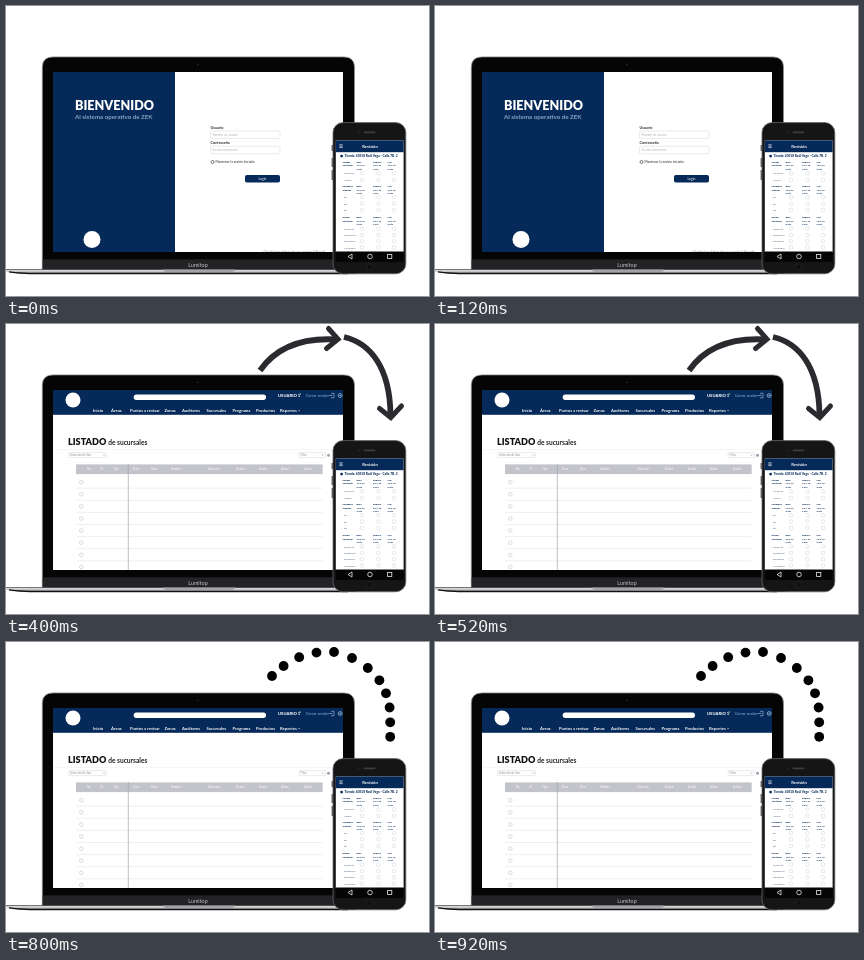
Recreate the animation shown at these times as an HTML page. Size 423x290 px, loop 1 s.

```html
<!DOCTYPE html>
<html lang="es">
<head>
<meta charset="utf-8">
<title>Panel y app</title>
<style>
  html, body { margin: 0; width: 100%; height: 100%; overflow: hidden; background: #fff; }
  svg { display: block; width: 100vw; height: 100vh; }
  text { font-family: Lato, "Open Sans", sans-serif; }
</style>
</head>
<body>
<svg id="stage" viewBox="0 0 423 290">
  <defs>
    <linearGradient id="metal" x1="0" x2="0" y1="0" y2="1">
      <stop offset="0" stop-color="#e4e5e7"/>
      <stop offset=".45" stop-color="#c3c5c8"/>
      <stop offset="1" stop-color="#1d1d1f"/>
    </linearGradient>
    <clipPath id="view"><rect x="47" y="66" width="290" height="180"/></clipPath>
  </defs>
  <g id="laptop"></g>
  <g clip-path="url(#view)">
    <g id="login"></g>
    <g id="list"></g>
  </g>
  <g id="phone"></g>
  <g id="arrowA"></g>
  <g id="arrowB"></g>
  <g id="dotsA"></g>
  <g id="dotsB"></g>
</svg>
<script>
const NAVY = '#052a5a', INK = '#2b2b2f', GREY = '#8b8f98', LINE = '#e3e4e8';
const LOOP = 1000;
const $ = id => document.getElementById(id);

function add(parent, tag, attrs, content) {
  const el = document.createElementNS('http://www.w3.org/2000/svg', tag);
  for (const k in attrs) el.setAttribute(k, attrs[k]);
  if (content) el.textContent = content;
  parent.appendChild(el);
  return el;
}
const rect = (p, x, y, width, height, fill, more) =>
  add(p, 'rect', { x, y, width, height, fill, ...more });
const circle = (p, cx, cy, r, fill, more) => add(p, 'circle', { cx, cy, r, fill, ...more });
const path = (p, d, stroke, width, more) =>
  add(p, 'path', { d, fill: 'none', stroke, 'stroke-width': width, ...more });
const text = (p, x, y, size, str, fill = INK, weight = 400, anchor = 'start') =>
  add(p, 'text', { x, y, 'font-size': size, fill, 'font-weight': weight, 'text-anchor': anchor }, str);
const box = (p, x, y, w, h) =>
  rect(p, x, y, w, h, '#fff', { stroke: '#d3d5d9', 'stroke-width': .5, rx: .8 });

function drawLaptop(g) {
  path(g, 'M36.3 264V61.5Q36.3 50.9 47 50.9H337.8Q348.5 50.9 348.5 61.5V264Z', '#8f9194', .8, { fill: '#050505' });
  rect(g, 36.7, 253.3, 311.4, 10.2, '#232326');
  rect(g, 47, 66, 290, 180, '#fff');
  circle(g, 192, 58.5, .8, '#2b2f38');
  text(g, 192, 261, 5.4, 'Lumitop', '#c4c4c6', 400, 'middle');
  path(g, 'M0 263.5H350V268H32Q10 268 0 265.5Z', 'none', 0, { fill: 'url(#metal)' });
  path(g, 'M0 263.5H350', '#222', .6);
  path(g, 'M156.5 263.6Q157.5 266 160 266H226Q228.5 266 229.5 263.6Z', 'none', 0, { fill: '#a2a4a8' });
  path(g, 'M3 265.8Q14 267.6 32 267.6H342', '#111', 1.2);
}

function drawLogin(g) {
  rect(g, 47, 66, 122, 182, NAVY);
  text(g, 69, 104, 12.6, 'BIENVENIDO', '#fff', 900);
  text(g, 69, 113, 6.2, 'Al sistema operativo de ZEK', '#8ba3c2', 700);
  circle(g, 86, 233.5, 8.5, '#fff');
  text(g, 204.5, 122.8, 3.8, 'Usuario', INK, 700);
  box(g, 204.5, 125, 69.5, 7.4);
  text(g, 206.5, 129.9, 3, 'Nombre de usuario', '#b0b3b9');
  text(g, 204.5, 138.2, 3.8, 'Contraseña', INK, 700);
  box(g, 204.5, 140.3, 69.5, 7.4);
  text(g, 206.5, 145.2, 3, 'Escriba contraseña', '#b0b3b9');
  circle(g, 206.5, 156, 1.5, '#fff', { stroke: INK, 'stroke-width': .6 });
  text(g, 209.5, 157.3, 3.3, 'Mantener la sesión iniciada', INK);
  rect(g, 239, 169, 35, 7.6, NAVY, { rx: 1.8 });
  text(g, 256.5, 174, 3.4, 'Login', '#fff', 400, 'middle');
  text(g, 256, 247.2, 3.8, '¿Olvidó los datos de su cuenta? Ayuda', GREY);
}

function drawList(g) {
  rect(g, 47, 66, 291, 24.8, NAVY);
  circle(g, 67, 76, 7.5, '#fff');
  rect(g, 127.7, 70.6, 132.3, 5.3, '#fff', { rx: 2.6 });
  text(g, 272, 72.8, 4.2, 'USUARIO 1', '#fff', 800);
  circle(g, 294.3, 70, .8, '#7fc9a0');
  text(g, 300, 72.8, 3.9, 'Cerrar sesión', '#8fb4d8');
  path(g, 'M325 69.3H328V73.8H325M322.5 71.5H326.5', '#a8c6e2', .6);
  circle(g, 334.2, 71.5, 2, 'none', { stroke: '#a8c6e2', 'stroke-width': .6 });
  path(g, 'M332.2 71.5h4M334.2 69.5v4', '#a8c6e2', .4);
  [['Inicio', 87], ['Áreas', 105], ['Puntos a revisar', 124], ['Zonas', 158.5], ['Auditores', 176],
   ['Sucursales', 200.5], ['Programa', 226.5], ['Productos', 250], ['Reportes', 274]]
    .forEach(([name, x]) => text(g, x, 88.2, 4.2, name, '#fff', 700));
  path(g, 'M292.3 86.6h1.6', '#fff', .6);

  text(g, 62, 121.3, 9.1, 'LISTADO', '#111', 900);
  text(g, 102.2, 121.3, 6.6, 'de sucursales', '#222', 700);
  path(g, 'M47 125.6H337', '#ececef', .5);
  box(g, 62.5, 128.6, 38, 5);
  text(g, 64, 132.1, 2.8, 'Selección de lista', GREY);
  path(g, 'M97 130.5l1.1 1.2 1.1-1.2', GREY, .5);
  box(g, 293, 128.6, 26.5, 5);
  text(g, 294.5, 132.1, 2.8, 'Filtro', GREY);
  path(g, 'M315.5 130.5l1.1 1.2 1.1-1.2', GREY, .5);
  circle(g, 322.5, 131.2, 1.5, '#9aa1ad');

  for (let i = 0; i < 8; i++) {
    const y = 158.2 + i * 12.1;
    circle(g, 75.3, y, 1.8, '#fff', { stroke: '#b4b7bd', 'stroke-width': .5 });
    path(g, `M70 ${y + 6}H316.5`, LINE, .6);
  }
  rect(g, 70, 140.4, 246.7, 9.7, '#c3c3ca');
  [['No.', 83], ['ID', 96], ['Tipo', 110], ['Clave', 130], ['Zona', 148], ['Nombre', 170], ['Dirección', 208],
   ['Ciudad', 234], ['Estado', 257], ['Activo', 279], ['Acción', 302]]
    .forEach(([name, x]) => text(g, x, 146.3, 2.7, name, '#f1f1f4', 700, 'middle'));
  path(g, 'M122.3 140V248', '#a5a7ae', .7);
}

function drawPhone(g) {
  [[139, 6], [152, 9], [164, 10]].forEach(([y, h]) => rect(g, 325.6, y, 1.6, h, '#55575b'));
  rect(g, 327, 116.6, 72.8, 151.2, '#151516', { rx: 10, stroke: '#66686c', 'stroke-width': .8 });
  rect(g, 357.5, 125.6, 12, 1.6, '#3b3c40', { rx: .8 });
  circle(g, 353, 126.4, .9, '#25272f');
  rect(g, 329.8, 134.5, 67.8, 111.5, '#fff');
  rect(g, 329.8, 134.5, 67.8, 11.7, NAVY);
  path(g, 'M333.3 138.8h3.4M333.3 140.2h3.4M333.3 141.6h3.4', '#fff', .6);
  text(g, 364, 142, 4.2, 'Revisión', '#fff', 700, 'middle');
  circle(g, 335.6, 150.1, 1.4, NAVY);
  text(g, 338.5, 151.3, 3.2, 'Tienda: 40518 Raúl Vega - Calle 7B. 2', NAVY, 800);

  const sections = [
    [157, 'Limpia', 'Ventanal', [167.3, 174], ['Sin polvo', 'Vidrios']],
    [181.3, 'Limpieza', 'Trabajo', [191.2, 197.5, 204], ['B1', 'B2', 'B3']],
    [212.3, 'Grupo', 'Ventanal', [222.5, 229, 235.3, 241.5], ['Producto', 'Referencia', 'Estantería', 'Mostrador']]
  ];
  const marks = [['Bien', 350.5, 356], ['Regular', 367, 372.5], ['Mal', 381.5, 388]];
  for (const [y, a, b, rows, names] of sections) {
    [a, b].forEach((s, i) => text(g, 336.5, y + i * 3.3, 2.6, s, NAVY, 800));
    for (const [name, x] of marks)
      [name, '10 a 15', '5 pts'].forEach((s, i) => text(g, x, y + i * 3.3, 2.5, s, NAVY, 700));
    rows.forEach((ry, i) => {
      text(g, 338, ry + 1, 2.5, names[i], '#51607a');
      marks.forEach(m => circle(g, m[2], ry, 1.8, '#fff', { stroke: '#cdd0d5', 'stroke-width': .5 }));
    });
  }
  rect(g, 329.8, 245.5, 67.8, 10.5, '#050505');
  path(g, 'M346 248v5l-4-2.5z', '#e8e8e8', .8);
  circle(g, 364, 250.5, 2.3, 'none', { stroke: '#e8e8e8', 'stroke-width': .8 });
  rect(g, 381.6, 248.4, 4.2, 4.2, 'none', { stroke: '#e8e8e8', 'stroke-width': .8 });
  circle(g, 363.6, 261, 3.3, '#101012', { stroke: '#2c2d30', 'stroke-width': .6 });
}

function drawArrow(g, shaft, head) {
  path(g, shaft, INK, 5.8);
  path(g, head, INK, 5, { 'stroke-linecap': 'round' });
}
const drawDots = (g, points) => points.forEach(([x, y]) => circle(g, x, y, 4.9, '#000'));

drawLaptop($('laptop'));
drawLogin($('login'));
drawList($('list'));
drawPhone($('phone'));
drawArrow($('arrowA'), 'M254 46.5C269 25 294 13.5 330 15.5', 'M322.5 4.5L332 15.2L320.5 24.5');
drawArrow($('arrowB'), 'M338 13C364 19 384 43 384.5 91', 'M373.5 84.5L384.8 93.5L395.5 82');
drawDots($('dotsA'), [[266, 34], [277.6, 24], [293.2, 15.2], [310.5, 10.6], [328, 10]]);
drawDots($('dotsB'), [[346, 16], [361.8, 26], [373.4, 38.3], [380, 51.3], [383.6, 65.5], [384.2, 80.3], [384.2, 94.8]]);

// id, shown from, hidden at (ms)
const steps = [
  ['login', 0, 200],
  ['list', 200, 1000],
  ['arrowA', 200, 600],
  ['arrowB', 400, 800],
  ['dotsA', 600, 1000],
  ['dotsB', 800, 1000]
];
for (const [id, from, to] of steps) {
  const key = (ms, opacity) => ({ offset: ms / LOOP, opacity, easing: 'step-end' });
  const keys = [key(from, 1)];
  if (from > 0) keys.unshift(key(0, 0));
  keys.push(key(to, to < LOOP ? 0 : 1));
  if (to < LOOP) keys.push(key(LOOP, 0));
  const anim = $(id).animate(keys, { duration: LOOP, iterations: Infinity });
  anim.startTime = 0;
}
</script>
</body>
</html>
```
